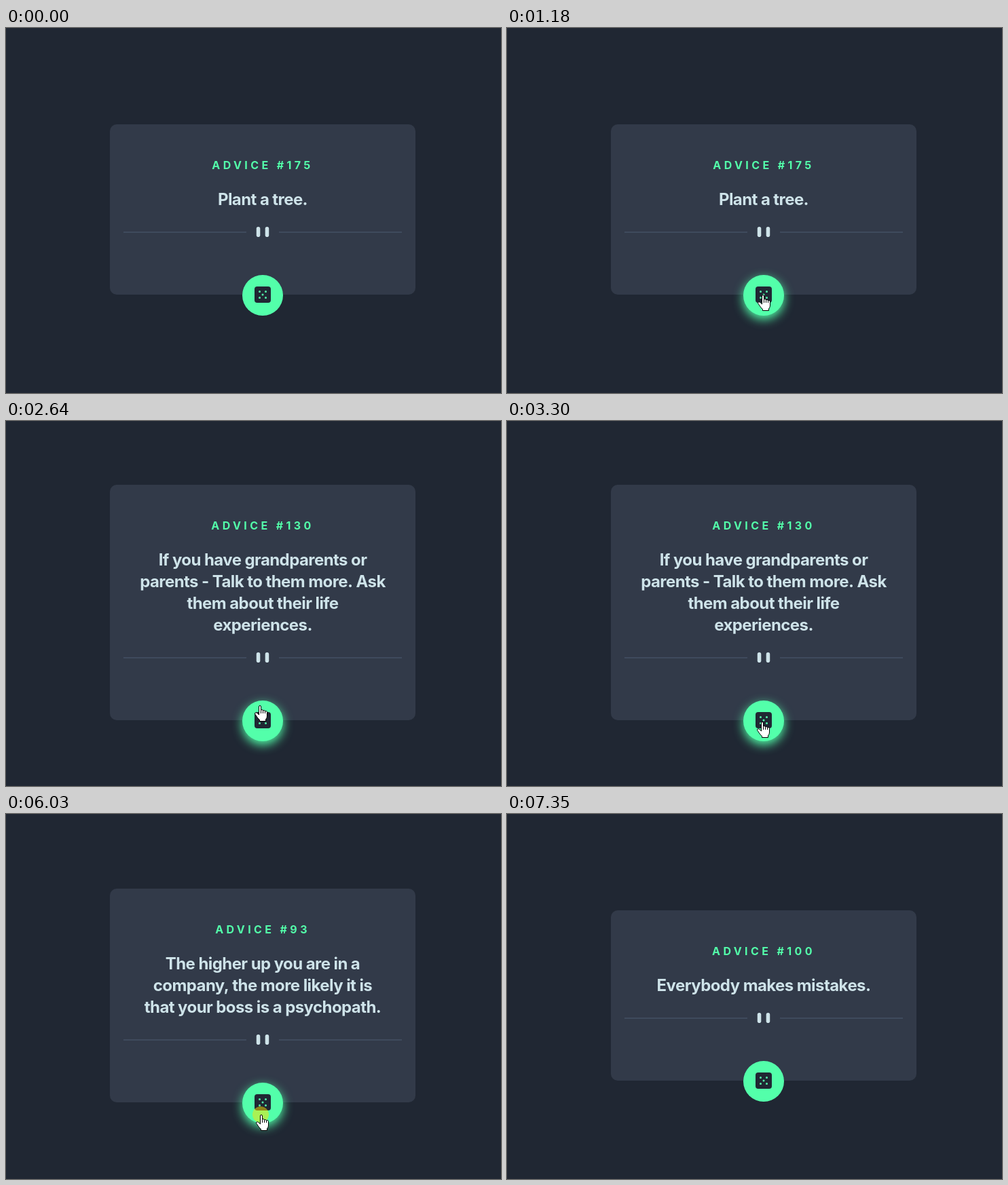
Recreate the animation shown at these times as an HTML page with a canvas. Size 729 by 538 pixels, loop 8080 ms.

```html
<!DOCTYPE html>
<html lang="en">
<head>
<meta charset="utf-8">
<title>Advice card</title>
<style>
  html, body { margin: 0; width: 100%; height: 100%; overflow: hidden; background: #202733; }
  canvas { display: block; }
</style>
</head>
<body>
<canvas id="stage" width="729" height="538"></canvas>
<script>
const ctx = document.getElementById('stage').getContext('2d');
const LOOP = 8080;
const CX = 378;
const DARK = '#202733', CARD = '#323a49', GREEN = '#53ffaa', PALE = '#cee3e9', RULE = '#4f5d74';
const FONT = 'Inter, "Open Sans", sans-serif';

const cards = [
  { from: 0, id: 175, lines: ['Plant a tree.'] },
  { from: 1910, id: 130, lines: ['If you have grandparents or', 'parents - Talk to them more. Ask', 'them about their life', 'experiences.'] },
  { from: 3570, id: 93, lines: ['The higher up you are in a', 'company, the more likely it is', 'that your boss is a psychopath.'] },
  { from: 6490, id: 100, lines: ['Everybody makes mistakes.'] }
];

const clicks = [
  { from: 1120, to: 1180, x: 376, y: 393 },
  { from: 3170, to: 3300, x: 375, y: 443 },
  { from: 6030, to: 6160, x: 375, y: 443 }
];

const handPath = new Path2D(
  'M-.5 2Q-.5 .5 1 .5Q2.5 .5 2.5 2V7.5Q2.9 6.5 4.1 6.5Q5.5 6.6 5.5 8.5' +
  'Q5.9 7.5 7.1 7.5Q8.5 7.6 8.5 9.5Q8.9 8.5 10.1 8.5Q11.5 8.8 11.5 10.5V16' +
  'Q11.5 18.5 9.5 21V23.5H.5V21.5Q-2.5 19 -4 16.2L-6 13.4' +
  'Q-7 11.8 -5.8 11Q-4.5 10.2 -3 11.6L-.5 14Z');
const fingerPath = new Path2D('M2.5 7.5V12M5.5 8.5V12M8.5 9.5V12');
const arrowPath = new Path2D('M.5 .5V16.5L4.2 13L6.7 18.7L9.2 17.6L6.7 12H11.8Z');

const mix = (a, b, u) => a + (b - a) * u;
const bend = (a, b, c, u) => mix(mix(a, b, u), mix(b, c, u), u);
const stepOf = (t, from, gap) => Math.floor((t - from) / gap + 0.01);

// Pointer position; it moves in steps, about 15 times a second.
function pointerAt(t) {
  if (t < 260 || t >= 7350) return null;
  if (t < 980) {
    const u = 1 - (1 - stepOf(t, 260, 65.5) / 11) ** 2;
    return { x: mix(596, 376, u), y: mix(516, 393, u) };
  }
  if (t < 2440) return { x: 376, y: 393 };
  if (t < 2970) {
    const u = (stepOf(t, 2440, 66.3) + 1) / 9;
    return { x: bend(376, 370, 375, u), y: bend(393, 426, 443, u) };
  }
  if (t < 6950) return { x: 375, y: 443 };
  const u = ((stepOf(t, 6950, 66.7) + 1) / 6) ** 1.5;
  return { x: mix(375, 564, u), y: mix(443, 516, u) };
}

// Hover only changes when the pointer moves, so it survives a card resize.
function isHover(t, p, buttonY) {
  if (!p) return false;
  const resting = t >= 980 && t < 2440 || t >= 2970 && t < 6950;
  return resting || Math.hypot(p.x - CX, p.y - buttonY) < 30;
}

function text(str, y, font, spacing, color) {
  ctx.font = font + ' ' + FONT;
  ctx.letterSpacing = spacing + 'px';
  ctx.fillStyle = color;
  ctx.fillText(str, CX, y);
}

function roundRect(x, y, w, h, r, color) {
  ctx.fillStyle = color;
  ctx.beginPath();
  ctx.roundRect(x, y, w, h, r);
  ctx.fill();
}

function disc(x, y, r, color) {
  ctx.fillStyle = color;
  ctx.beginPath();
  ctx.arc(x, y, r, 0, Math.PI * 2);
  ctx.fill();
}

// Drawn on a 444 x 16 grid, shown at 410 x 15.
function drawDivider(y) {
  ctx.save();
  ctx.translate(173, y);
  ctx.scale(410 / 444, 15 / 16);
  ctx.fillStyle = RULE;
  ctx.fillRect(0, 8, 196, 1);
  ctx.fillRect(248, 8, 196, 1);
  for (const x of [212, 226]) roundRect(x, 0, 6, 16, 3, PALE);
  ctx.restore();
}

function drawButton(y, glow) {
  ctx.save();
  if (glow) {
    ctx.shadowColor = GREEN;
    ctx.shadowBlur = 15;
    ctx.shadowOffsetY = 5;
  }
  disc(CX, y, 30, GREEN);
  ctx.restore();
  roundRect(CX - 12, y - 13, 24, 24, 4, DARK);
  for (const [dx, dy] of [[0, 0], [-1, -1], [1, -1], [-1, 1], [1, 1]]) {
    disc(CX + dx * 4.5, y - 1 + dy * 4.5, 1.5, GREEN);
  }
}

function drawPointer(p, hand) {
  ctx.save();
  ctx.translate(Math.round(p.x), Math.round(p.y));
  ctx.fillStyle = '#fff';
  ctx.strokeStyle = '#000';
  ctx.lineWidth = 1;
  ctx.lineJoin = 'round';
  const shape = hand ? handPath : arrowPath;
  ctx.fill(shape);
  ctx.stroke(shape);
  if (hand) ctx.stroke(fingerPath);
  ctx.restore();
}

function draw(t) {
  const card = cards.filter(c => t >= c.from).pop();
  const extra = 32 * (card.lines.length - 1);
  const top = 142 - extra / 2;
  const height = 251 + extra;
  const buttonY = top + height + 1;

  ctx.fillStyle = DARK;
  ctx.fillRect(0, 0, 729, 538);
  roundRect(153, top, 450, height, 10, CARD);

  ctx.textAlign = 'center';
  text('ADVICE #' + card.id, top + 66, '700 16px', 4.4, GREEN);
  card.lines.forEach((line, i) => text(line, top + 119 + 32 * i, '700 24px', -0.58, PALE));
  drawDivider(top + 151 + extra);

  const p = pointerAt(t);
  const hover = isHover(t, p, buttonY);
  drawButton(buttonY, hover);

  for (const c of clicks) {
    if (t >= c.from && t < c.to) disc(c.x, c.y, 12, 'rgba(255, 228, 0, 0.5)');
  }
  if (p) drawPointer(p, hover);
}

const start = performance.now();
function tick() {
  draw((performance.now() - start) % LOOP);
  requestAnimationFrame(tick);
}
tick();
</script>
</body>
</html>
```
